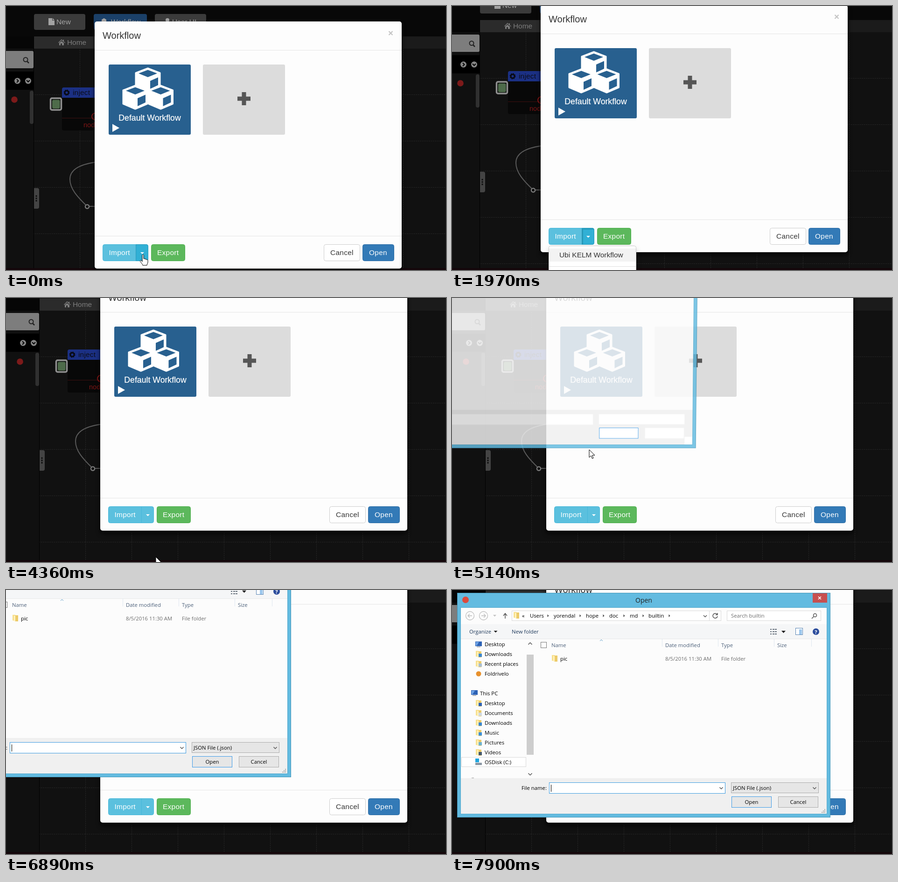
These frames come from a looping animation (943 px wide and 564 px high, 8 s). An HTML page:

```html
<!DOCTYPE html>
<html lang="en">
<head>
<meta charset="utf-8">
<title>Import a workflow</title>
<style>
html, body { margin: 0; width: 100%; height: 100%; overflow: hidden; background: #111; }
#stage { position: relative; width: 943px; height: 564px; overflow: hidden; }
svg { position: absolute; left: 0; top: 0; width: 943px; height: 564px; overflow: visible; }
text { white-space: pre; }
#scene { font: 15.4px "Liberation Sans", Arial, sans-serif; }
#modal { filter: drop-shadow(0 6px 5px rgba(0,0,0,.8)); }
#menu { fill: #333; }
#menuBox { filter: drop-shadow(0 6px 6px rgba(0,0,0,.175)); }
.label { fill: #fff; letter-spacing: .3px; }
#dialog { font: 11.3px "Open Sans", "Noto Sans", sans-serif; transform-origin: 411px 246px; }
.muted { fill: #6d6d6d; }
.head { fill: #4c607a; }
.line { fill: none; stroke: #555; stroke-width: 1.5; }
.field { stroke: #acacac; fill: #e6e6e6; }
.input { stroke: #3d9be0; fill: #fff; }
.blank .detail { display: none; }
.blank .field { fill: #fff; stroke: none; }
#grip { display: none; }
.blank #grip { display: inline; }
</style>
</head>
<body>
<div id="stage">
<svg id="scene">
  <defs>
    <pattern id="grid" x="158" y="189" width="99" height="99" patternUnits="userSpaceOnUse">
      <path d="M0 .5H99M.5 0V99" stroke="#2b2b2b" stroke-dasharray="2 2"/>
    </pattern>
    <g id="cube">
      <path d="M0 1L26 11V40L0 51L-26 40V11Z" fill="#fff" stroke="#fff" stroke-width="3" stroke-linejoin="round"/>
      <path d="M-20 12L0 4.500L20 12L0 20ZM5 28L22 20.500V37L5 45Z" fill="#28608f"/>
    </g>
  </defs>
  <rect width="943" height="564" fill="#111"/>
  <g class="pan">
    <rect x="60" y="91" width="1000" height="700" fill="url(#grid)"/>
    <rect x="-40" width="1080" height="65" fill="#080808"/>
    <rect x="60" y="65" width="980" height="26" fill="#1b1b1b"/>
    <rect x="60" y="65" width="142" height="26" fill="#2b2b2b"/>
    <g fill="#3b3b3b">
      <rect x="60" y="17" width="110" height="34" rx="4"/>
      <rect x="188" y="17" width="114" height="34" rx="4" fill="#1b4068"/>
      <rect x="319" y="17" width="110" height="34" rx="4"/>
    </g>
    <g fill="#a3a3a3">
      <path d="M91 26h8v5h5v10h-13zM100 26l4 4h-4z"/>
      <text x="108" y="39">New</text>
      <path d="M205 29l5-3 5 3v7l-5 3-5-3z"/>
      <text x="225" y="39">Workflow</text>
      <circle cx="346" cy="30" r="4"/>
      <text x="356" y="39">User UI</text>
    </g>
    <g fill="#7d7d7d">
      <path d="M112 78l7-7 3 3v-2h2v4l3 2-1 1-7-6-6 6zM114 79l5-4 5 4v5h-4v-4h-3v4h-3z"/>
      <text x="131" y="83">Home</text>
    </g>
    <path d="M190 334C150 340 137 354 137 370C137 390 152 407 174 428H190" fill="none" stroke="#5a5a5a" stroke-width="2"/>
    <circle cx="174" cy="428.500" r="4" fill="#000" stroke="#777" stroke-width="2.500"/>
    <path d="M120 196H260V266H124Q120 266 120 262Z" fill="#080808"/>
    <path d="M260 174H124Q120 174 120 178V196H260Z" fill="#1b3084"/>
    <circle cx="130" cy="185" r="4" fill="none" stroke="#080a14" stroke-width="3"/>
    <circle cx="130" cy="185" r="5.500" fill="none" stroke="#080a14" stroke-width="2" stroke-dasharray="2.200 2.100"/>
    <text x="143" y="190" letter-spacing=".2" fill="#0b0d18">inject</text>
    <path d="M120 239.500H190" stroke="#3f1010"/>
    <circle cx="191" cy="236" r="7" fill="none" stroke="#851515" stroke-width="2"/>
    <text x="166" y="259" font-size="14.500" fill="#7d1515">node</text>
    <rect x="95.500" y="197" width="23" height="25" rx="3" fill="#101410" stroke="#8f8f8f" stroke-width="3.500"/>
    <rect x="99" y="200.500" width="16.500" height="18.500" rx="3" fill="#4e6b4a"/>
    <g>
      <rect x="-40" y="65" width="99" height="720" fill="#101010"/>
      <rect x="-40" y="65" width="99" height="26" fill="#060606"/>
      <path d="M59.500 65V800" stroke="#000"/>
      <rect x="-40" y="96" width="99" height="37" rx="3" fill="#7d7d7d"/>
      <path d="M45.500 118.500L49 122" stroke="#222" stroke-width="2.500"/>
      <circle cx="42" cy="114.500" r="4.500" fill="none" stroke="#222" stroke-width="2"/>
      <rect x="-40" y="140" width="99" height="39" fill="#000"/>
      <g fill="#858585"><circle cx="24.500" cy="160" r="6.500"/><circle cx="47.500" cy="160" r="6.500"/></g>
      <path d="M23 156.500l3.500 3.500-3.500 3.500M44 158.500l3.500 3.500 3.500-3.500" fill="none" stroke="#000" stroke-width="2"/>
      <circle cx="18" cy="200" r="6.800" fill="#7d1a1a"/>
      <rect x="51" y="181" width="8" height="71" rx="4" fill="#303030"/>
      <path d="M60 389h7q4 0 4 4v36q0 4-4 4h-7z" fill="#444"/>
      <path d="M65 404.500v13" stroke="#0a0a0a" stroke-width="3" stroke-dasharray="3 2"/>
    </g>
  </g>
  <rect y="560" width="943" height="4" fill="#14060a"/>
  <g class="pan">
    <rect id="modal" x="190" y="33" width="658" height="528" rx="5" fill="#fdfdfd"/>
    <text x="207" y="70" font-size="20" fill="#333">Workflow</text>
    <path d="M820.500 54l8 8m0-8l-8 8" stroke="#c4c4c4" stroke-width="2.300"/>
    <path d="M190 94.500H848M190 491.500H848" stroke="#e5e5e5"/>
    <rect x="220" y="125" width="176" height="150" rx="3" fill="#28608f"/>
    <use href="#cube" x="304" y="132"/>
    <use href="#cube" x="277" y="169"/>
    <use href="#cube" x="331.500" y="169"/>
    <text x="308" y="245" font-size="17.700" text-anchor="middle" fill="#fff" stroke="#fff" stroke-width=".2">Default Workflow</text>
    <path d="M228 252L243 260.500L228 269Z" fill="#fff"/>
    <rect x="422" y="125" width="176" height="150" rx="3" fill="#dcdcdc"/>
    <path d="M510 184v28M496 198h28" stroke="#565656" stroke-width="9"/>
    <rect x="207.500" y="509.500" width="97" height="35" rx="4" fill="#5bc0de" stroke="#46b8da"/>
    <path d="M278.500 510V545" stroke="#46b8da"/>
    <path id="toggle" d="M278.500 509.500H300.500Q304.500 509.500 304.500 513.500V540.500Q304.500 544.500 300.500 544.500H278.500Z" fill="#31b0d5" stroke="#269abc"/>
    <path id="pressed" d="M280 511.500H303M280 511V544" fill="none" stroke="#1d7f9b" stroke-opacity=".5" stroke-width="2"/>
    <path d="M288 526h8l-4 4z" fill="#fff"/>
    <rect x="311.500" y="509.500" width="72" height="35" rx="4" fill="#5cb85c" stroke="#4cae4c"/>
    <rect x="681.500" y="509.500" width="77" height="35" rx="4" fill="#fff" stroke="#ccc"/>
    <rect x="764.500" y="509.500" width="67" height="35" rx="4" fill="#337ab7" stroke="#2e6da4"/>
    <g class="label">
      <text x="220.500" y="532">Import</text><text x="324" y="532">Export</text>
      <text x="695" y="532" style="fill:#333">Cancel</text><text x="778" y="532">Open</text>
    </g>
    <g id="menu">
      <rect id="menuBox" x="207.500" y="547.500" width="187" height="88" rx="4" fill="#fff" stroke="#ccc"/>
      <rect id="firstHover" x="208" y="553" width="186" height="28" fill="#f3f3f3"/>
      <rect id="secondHover" x="208" y="602" width="186" height="28" fill="#f3f3f3"/>
      <path d="M208 591.500H394" stroke="#e0e0e0"/>
      <text x="230" y="572">Ubi KELM Workflow</text>
      <text x="230" y="621">Node-RED Workflow</text>
      <rect id="focusRing" x="208" y="602" width="186" height="28" fill="none" stroke="#5e9ed6" stroke-width="2"/>
    </g>
  </g>
</svg>

<svg id="dialog">
  <defs>
    <g id="folder">
      <path d="M1 0h6v13l-6-1z" fill="#f8e08e"/>
      <path d="M6 1h7v13h-7z" fill="#eccb6b"/>
      <path d="M4 2h3v12l-3-1z" fill="#fff3c0"/>
    </g>
  </defs>
  <rect x="11.500" y="6.500" width="799" height="479" fill="#63bbe0" stroke="#4495b8"/>
  <rect x="18.500" y="37.500" width="785" height="441" fill="#fcfcfc" stroke="#54a8cb"/>
  <rect x="19" y="402" width="784" height="76" fill="#f0f0f0"/>
  <rect class="field input" x="208.500" y="411.500" width="377" height="23"/>
  <rect class="field" x="598.500" y="411.500" width="187" height="22"/>
  <rect class="field" x="599.500" y="441.500" width="85" height="23" style="stroke:#3d9be8"/>
  <rect class="field" x="699.500" y="441.500" width="85" height="23"/>
  <rect id="grip" x="786" y="461" width="17" height="17" fill="#fff"/>
  <g class="detail">
    <circle cx="29" cy="21" r="7" fill="#dd4b3e"/>
    <text x="411" y="27" font-size="14" text-anchor="middle" fill="#222">Open</text>
    <rect x="773" y="7" width="31" height="20" fill="#c75050"/>
    <path d="M785 14l6 6m0-6l-6 6" stroke="#fff" stroke-width="1.600"/>
    <rect x="19" y="73" width="784" height="31" fill="#f5f6f7"/>
    <path d="M19 104.500H803" stroke="#e8e8e8"/>
    <g fill="none" stroke="#bdbdbd" stroke-width="1.300">
      <circle cx="38.500" cy="55" r="9"/><circle cx="67.500" cy="55" r="9"/>
      <path d="M43 55h-9m4-4l-4 4 4 4M63 55h9m-4-4l4 4-4 4"/>
    </g>
    <path d="M88 53h7l-3.500 4z" fill="#c4c4c4"/>
    <path class="line" d="M114 61V51m-4 4l4-5 4 5"/>
    <rect x="128.500" y="44.500" width="448" height="21" fill="#fff" stroke="#d9d9d9"/>
    <rect x="589.500" y="44.500" width="201" height="21" fill="#fff" stroke="#d9d9d9"/>
    <path d="M551.500 45V66" stroke="#d9d9d9"/>
    <use href="#folder" x="131" y="47"/>
    <g id="crumbs"><text x="150" y="59">«</text></g>
    <path class="line" d="M539 54l3.500 3.500 3.500-3.500M568 52a5 5 0 1 0 1 4M569 49v4h-4M775 57l-4 4"/>
    <circle class="line" cx="778" cy="54" r="3.500"/>
    <text class="muted" x="598" y="59">Search builtin</text>
    <text x="37" y="93" fill="#1e395b">Organize</text>
    <text x="128" y="93" fill="#1e395b">New folder</text>
    <path d="M89.500 87h8l-4 4zM706 87h9l-4.500 5z" fill="#222"/>
    <path d="M682 84h3m-3 5h3m-3 5h3M687 84h4m-4 5h4m-4 5h4M692 84h4m-4 5h4m-4 5h4" stroke="#66707c" stroke-width="2"/>
    <rect x="736.500" y="81.500" width="15" height="14" fill="#fff" stroke="#5a86b5"/>
    <rect x="744" y="84" width="6" height="11" fill="#9cc8ee"/>
    <circle cx="780" cy="89" r="7" fill="#2b4c9c"/>
    <text x="780" y="93.500" text-anchor="middle" font-weight="700" fill="#fff">?</text>
    <path d="M450.500 104V121M570.500 104V121M690.500 104V121M770.500 104V121" stroke="#dfe7f0"/>
    <path d="M317 109l3-3 3 3" fill="none" stroke="#5b9ac4"/>
    <rect x="190.500" y="111.500" width="12" height="12" fill="#fff" stroke="#777"/>
    <g class="head">
      <text x="213" y="122">Name</text><text x="457" y="122">Date modified</text>
      <text x="577" y="122">Type</text><text x="697" y="122">Size</text>
    </g>
    <use href="#folder" x="213" y="139"/>
    <text x="232" y="151">pic</text>
    <text class="muted" x="457" y="151">8/5/2016 11:30 AM</text>
    <text class="muted" x="577" y="151">File folder</text>
    <rect x="20.500" y="357.500" width="138" height="20" fill="#fff" stroke="#d9d9d9"/>
    <g id="places"></g>
    <path d="M42 401.500h5" stroke="#999"/>
    <rect x="160" y="138" width="15" height="214" fill="#cdcdcd"/>
    <path class="line" d="M163.500 116.500l4-4 4 4M163.500 391.500l4 4 4-4M573.500 421.500l3.500 3.500 3.500-3.500M773.500 421.500l3.500 3.500 3.500-3.500"/>
    <text x="149" y="427">File name:</text>
    <path d="M212.500 416V431" stroke="#000"/>
    <text x="602" y="427">JSON File (.json)</text>
    <text x="642" y="457" text-anchor="middle">Open</text>
    <text x="742" y="457" text-anchor="middle">Cancel</text>
    <path d="M792 475h9M795 472h6M798 469h3" stroke="#aaa" stroke-width="2" stroke-dasharray="2 1"/>
  </g>
</svg>

<svg>
  <g fill="#fff" stroke="#000" stroke-linejoin="round">
    <path id="hand" d="M5 1.500C5 -.5 8 -.5 8 1.500V9C9 8.200 11 8.500 11 10C12 9.200 14 9.700 14 11C15 10.400 17 11 17 12.500V16C17 19 15 20 15 23H6C6 21 3 18 1 15C-.5 13 2 11.500 3.500 13L5 15Z"/>
    <path id="arrow" d="M0 0V16.500L4 13L6.500 19L9 18L6.500 12H12Z"/>
  </g>
</svg>
</div>

<script>
const LOOP = 8000;
const $ = id => document.getElementById(id);

// Tracks hold each value until the next key: [time, ...values]
const pan = [[0, 0, 0], [1970, 0, -35], [2090, 0, -64], [2260, 0, -84], [2680, 1, -83], [2870, 4, -80], [3050, 12, -64]];
const cursor = [
  [0, "hand", 287, 531], [130, "hand", 291, 528], [300, "hand", 288, 528], [860, "hand", 288, 525], [980, ""],
  [3680, "arrow", 321, 556], [3820, "arrow", 321, 553], [4900, "arrow", 310, 470], [5020, "arrow", 300, 390],
  [5140, "arrow", 294, 324], [5260, "arrow", 283, 310], [5390, "arrow", 272, 299], [5650, "arrow", 248, 222],
  [5770, ""], [6890, "drag"], [7900, "arrow", 487, 23]
];
const drag = [
  [0, -280, -160], [6890, -200, -86], [7010, -170, -56], [7130, -130, -26], [7250, -91, -2],
  [7400, -55, -5], [7520, -22, -2], [7640, 3, 1], [7760, 0, 0]
];
// opacity, scale, tilt in degrees
const opening = [[0, 0, 1, 0], [4900, .2, .94, -7], [5020, .55, .965, -4.5], [5140, .84, .985, -2.3], [5260, .97, .996, -.6], [5390, 1, 1, 0]];

const at = (track, t) => track.findLast(key => key[0] <= t).slice(1);
const show = (id, on) => $(id).style.display = on ? "inline" : "none";
const label = (x, y, text) => `<text x="${x}" y="${y}">${text}</text>`;

const crumbs = { Users: 167, yorendal: 218, hope: 287, doc: 337, md: 381, builtin: 421 };
$("crumbs").innerHTML += Object.entries(crumbs).map(([name, x]) => label(x, 59, name)).join("") +
  [206, 275, 325, 369, 410, 466].map(x => `<path d="M${x - 1.5} 52l3 3-3 3z" fill="#444"/>`).join("");

const monitor = (x, y) => `<path d="M${x} ${y}h14v10h-14z" fill="#2d62b5"/><path d="M${x + 1} ${y + 1}h7l-5 8h-2z" fill="#6fa4e6"/><path d="M${x + 3} ${y + 11.5}h8" stroke="#777"/>`;
const folder = (y, accent) => `<use href="#folder" x="50" y="${y - 11}"/><rect x="57" y="${y - 5}" width="7" height="7" fill="${accent}"/>`;
const places = [
  ["Desktop"], ["Downloads", "#3a86cf"], ["Recent places", "#a9bfd3"], ["Foldrivelo"], [], ["This PC"], ["Desktop", "#2d62b5"],
  ["Documents", "#cfd8e0"], ["Downloads", "#3a86cf"], ["Music", "#3d8fd6"], ["Pictures", "#6fb3cf"], ["Videos", "#42586e"], ["OSDisk (C:)"]
];
$("places").innerHTML = places.map(([name, accent], i) => {
  if (!name) return "";
  const y = 120 + 21 * i;
  const icon = accent ? folder(y, accent)
    : i == 0 ? monitor(50, y - 10)
    : i == 3 ? `<circle cx="57" cy="${y - 4}" r="5.500" fill="#e8912d"/>`
    : i == 5 ? monitor(41, y - 11)
    : `<path d="M50 ${y - 3}h14v5h-14z" fill="#8b98a5"/><rect x="50" y="${y - 12}" width="8" height="8" fill="#1fa5dd"/>`;
  return icon + label(i == 5 ? 60 : 70, y, name);
}).join("");

function render(t) {
  const [panX, panY] = at(pan, t);
  for (const layer of document.querySelectorAll(".pan")) layer.setAttribute("transform", `translate(${panX} ${panY})`);

  show("toggle", t < 4360);
  show("pressed", t >= 300 && t < 4360);
  show("menu", t >= 580 && t < 4360);
  show("firstHover", t >= 1120 && t < 3210);
  show("secondHover", t >= 3390);
  show("focusRing", t >= 4210);

  const [x, y] = at(drag, t);
  const [opacity, scale, tilt] = at(opening, t);
  const dialog = $("dialog");
  dialog.style.opacity = opacity;
  dialog.style.transform = `translate(${x}px,${y}px)` + (tilt ? ` perspective(1600px) rotateX(${tilt}deg) scale(${scale})` : "");
  dialog.classList.toggle("blank", t < 5260);

  let [kind, cx, cy] = at(cursor, t);
  if (kind == "drag") [kind, cx, cy] = ["arrow", x + 498, y + 24];
  for (const id of ["hand", "arrow"]) {
    show(id, id == kind);
    if (id == kind) $(id).setAttribute("transform", `translate(${cx} ${cy})`);
  }
}

const start = performance.now();
function tick() {
  render((performance.now() - start) % LOOP);
  requestAnimationFrame(tick);
}
tick();
</script>
</body>
</html>
```
